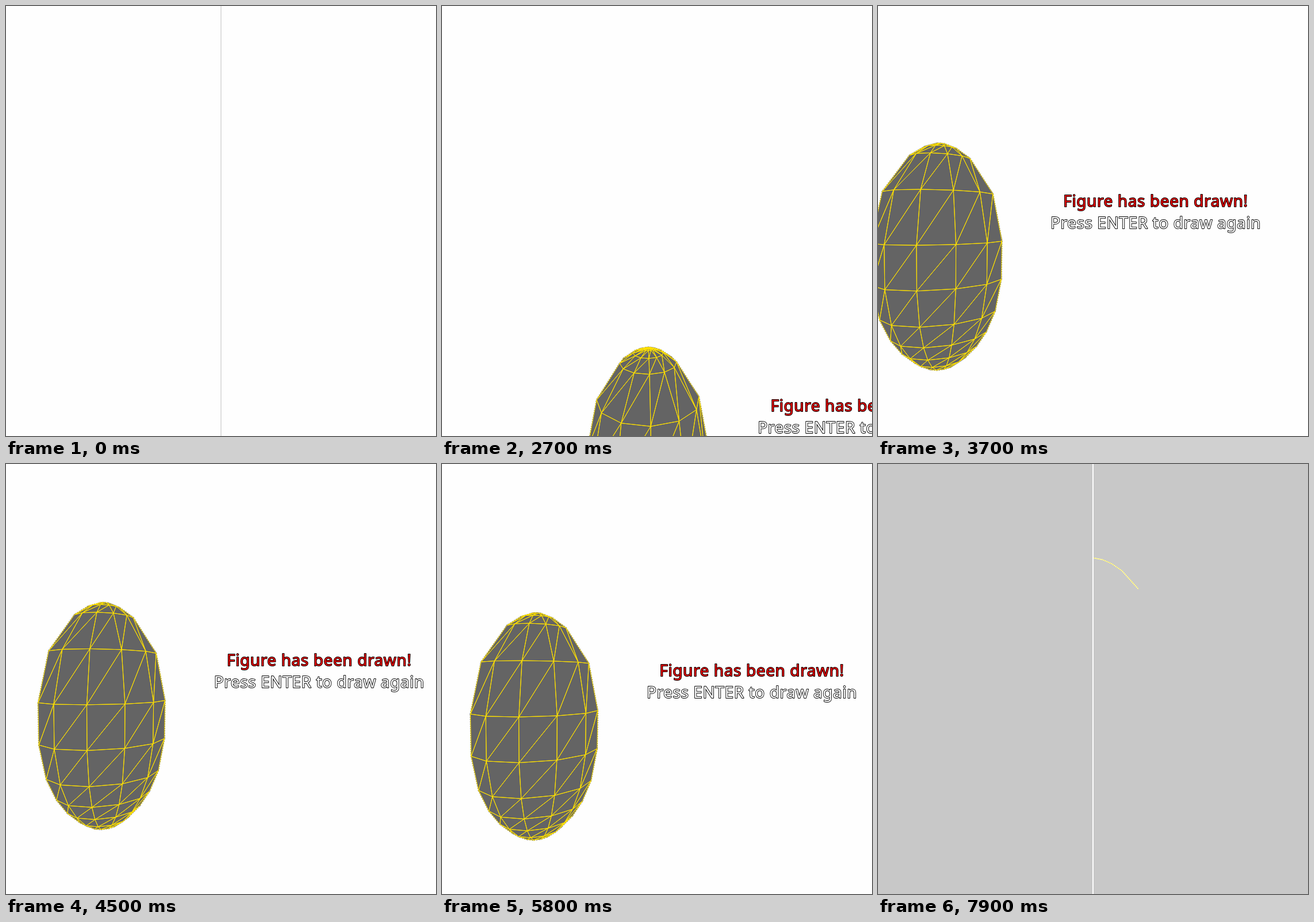
Animation of 748 by 748 pixels, one loop 8000 ms. Source, as an HTML page with a canvas:

```html
<!DOCTYPE html>
<html lang="en">
<head>
<meta charset="utf-8">
<title>Surface of revolution</title>
<style>
  html, body { margin: 0; width: 100%; height: 100%; overflow: hidden; background: #fefefe; }
  canvas { display: block; }
</style>
</head>
<body>
<canvas id="stage" width="748" height="748"></canvas>
<script>
const ctx = document.getElementById('stage').getContext('2d');
const SIZE = 748, MID = SIZE / 2, EYE = MID / Math.tan(Math.PI / 6);
const LOOP = 8000, STEP = 100, SIDES = 12, TWIST = 3.8;
const PAPER = 254, DRAWING = 200, HEIGHT = 391;

// Points [radius, y] of an egg outline, sampled at given depths below its top
const outline = (top, radius, depths) => depths.map(d => {
  const u = Math.abs(2 * d / HEIGHT - 1);
  return [1 + radius * (1 - u ** 2.4) ** 0.6, top + d];
});
const profile = outline(153, 104,
  [0, 1, 8, 25, 87, 170, 237, 293, 329, 354, 373, 385, HEIGHT]);
const nextProfile = outline(163, 112, [0, 3, 10, 22, 54]);

// Drags of the figure: start, end, target x, target y
const drags = [[2600, 3400, 192, 168], [3400, 3700, 109, 86], [4000, 4200, 125, 85],
  [4400, 4900, 354, 101], [4900, 5100, 172, 85], [5700, 5800, 165, 106]];

function dragAt(t) {
  let x = 382, y = 481;
  for (const [from, to, tx, ty] of drags) {
    const p = Math.min(1, Math.max(0, (t - from) / (to - from)));
    x += (tx - x) * p;
    y += (ty - y) * p;
  }
  return [x, y];
}

function clear(level) {
  const v = Math.round(level);
  ctx.fillStyle = `rgb(${v},${v},${v})`;
  ctx.fillRect(0, 0, SIZE, SIZE);
}

function axis(color) {
  ctx.fillStyle = color;
  ctx.fillRect(373, 0, 2, SIZE);
}

function stroke(color, width, dash = []) {
  ctx.strokeStyle = color;
  ctx.lineWidth = width;
  ctx.setLineDash(dash);
  ctx.stroke();
}

function drawCurve(points, elapsed, first) {
  const n = elapsed / STEP;
  clear(DRAWING + 18 * 0.22 ** n);
  axis('#fff');
  ctx.beginPath();
  for (const [r, y] of points.slice(0, n + first)) ctx.lineTo(MID + r + 0.5, y + 0.5);
  stroke('#fff', 1.3);
  stroke('#fff032', 1.3, [2, 1]);
}

function project(r, y, side, cx) {
  const a = (TWIST + side * 360 / SIDES) * Math.PI / 180;
  const s = EYE / (EYE - r * Math.cos(a));
  return [MID + (cx + r * Math.sin(a) - MID) * s + 0.5, MID + (y - MID) * s + 0.5];
}

const facesViewer = ([a, b, c]) =>
  (b[0] - a[0]) * (c[1] - a[1]) < (b[1] - a[1]) * (c[0] - a[0]);

function trace(faces) {
  ctx.beginPath();
  for (const [a, b, c] of faces) {
    ctx.moveTo(...a);
    ctx.lineTo(...b);
    ctx.lineTo(...c);
    ctx.closePath();
  }
}

function drawFigure(cx, cy) {
  const rings = profile.map(([r, y]) =>
    Array.from({ length: SIDES + 1 }, (_, i) => project(r, y + cy, i, cx)));
  const faces = [];
  for (let k = 0; k + 1 < rings.length; k++) {
    const up = rings[k], low = rings[k + 1];
    for (let i = 0; i < SIDES; i++) {
      faces.push([up[i], low[i], up[i + 1]], [up[i + 1], low[i], low[i + 1]]);
    }
  }
  ctx.lineJoin = 'round';
  // Far edges leave a dotted rim around the silhouette
  trace(faces.filter(f => !facesViewer(f)));
  stroke('#646464', 2.2, [2, 2]);
  trace(faces.filter(facesViewer));
  ctx.fillStyle = '#646464';
  ctx.fill();
  stroke('#ffe100', 1);
}

function label(text, x, y, color) {
  ctx.font = '28px "Noto Sans", "Open Sans", sans-serif';
  ctx.letterSpacing = '0.6px';
  ctx.textAlign = 'center';
  ctx.setLineDash([]);
  ctx.lineWidth = 1.8;
  ctx.strokeStyle = '#000';
  ctx.strokeText(text, x, y);
  ctx.fillStyle = color;
  ctx.fillText(text, x, y);
}

function draw(t) {
  if (t >= 1300 && t < 2600) {
    drawCurve(profile, t - 1300, 2);
  } else if (t >= 7500) {
    drawCurve(nextProfile, t - 7500, 1);
  } else if (t >= 2600 && t < 6000) {
    const [x, y] = dragAt(t);
    clear(PAPER - 14 * 0.02 ** ((t - 2600) / STEP));
    drawFigure(x, y);
    label('Figure has been drawn!', x + MID, y + 263, '#dc0000');
    label('Press ENTER to draw again', x + MID, y + 301, '#fefefe');
  } else {
    clear(PAPER);
    const resting = t < 200 || (t >= 6000 && t < 6300);
    axis(resting ? '#dedede' : '#fff');
  }
}

const start = performance.now();
function tick() {
  const t = (performance.now() - start) % LOOP;
  draw(Math.floor(t / STEP) * STEP);
  requestAnimationFrame(tick);
}
tick();
</script>
</body>
</html>
```
